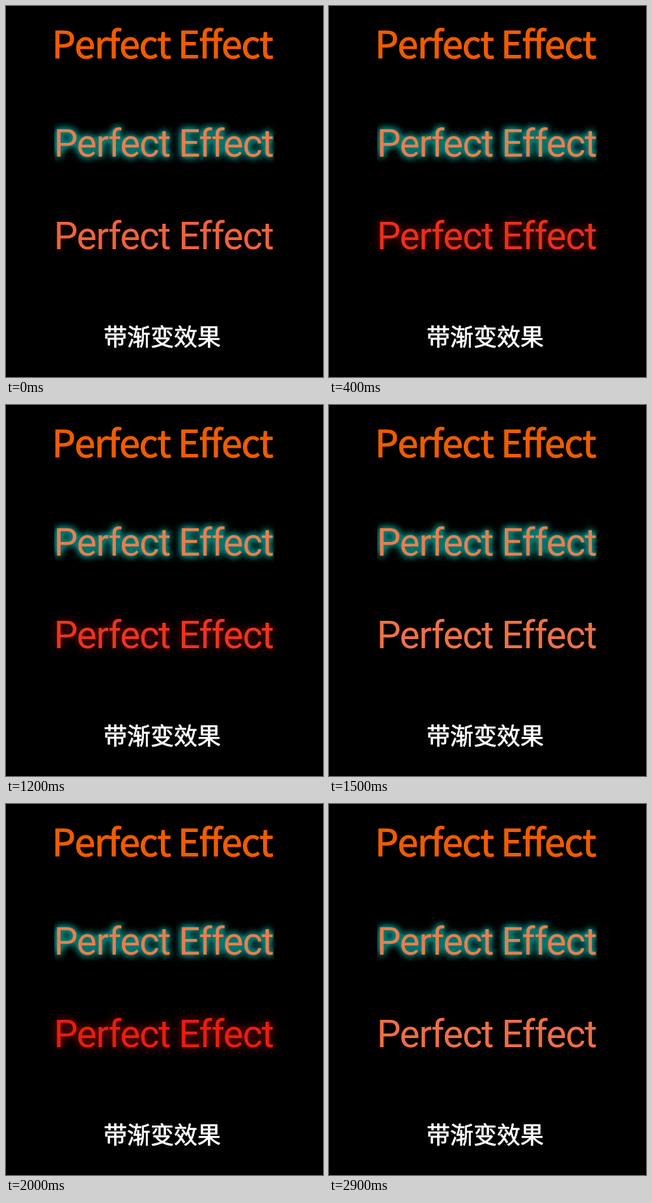
An HTML page that plays this animation: 487 px wide and 569 px high, repeating every 3000 ms.

```html
<!DOCTYPE html>
<html lang="zh">
<head>
<meta charset="utf-8">
<title>Text glow</title>
<style>
  html, body { margin: 0; width: 100%; height: 100%; overflow: hidden; background: #000; }
  svg { display: block; width: 487px; height: 569px; }
  text { font-kerning: none; font-variant-ligatures: none; }
  .solid, .caption { font-family: "Noto Sans CJK SC", "Noto Sans CJK", sans-serif; stroke-linejoin: round; }
  .solid { font-size: 57.5px; letter-spacing: -1.42px; fill: #ee5c00; stroke: #ee5c00; stroke-width: 1.1px; }
  .plain { font: 400 58.5px Roboto, sans-serif; letter-spacing: -1.37px; }
  .caption { font-size: 36px; fill: #fff; stroke: #fff; stroke-width: .7px; }
  .teal { fill: #00746d; filter: url(#halo); }
  .coral { fill: #e87e4e; }
  #glow { fill: #e81400; filter: blur(7px); opacity: 0; }
  #pulse { fill: #ee7548; }
</style>
</head>
<body>
<svg viewBox="0 0 487 569">
  <defs>
    <filter id="halo" filterUnits="userSpaceOnUse" x="74" y="178" width="338" height="63" color-interpolation-filters="sRGB">
      <feGaussianBlur stdDeviation="6"/>
      <feComponentTransfer><feFuncA type="linear" slope="3"/></feComponentTransfer>
    </filter>
  </defs>
  <text class="solid" x="70.4" y="79.7">Perfect Effect</text>
  <text class="plain teal" x="73.4" y="231" aria-hidden="true">Perfect Effect</text>
  <text class="plain coral" x="73.4" y="231">Perfect Effect</text>
  <text class="plain" id="glow" x="73.4" y="373" aria-hidden="true">Perfect Effect</text>
  <text class="plain" id="pulse" x="73.4" y="373">Perfect Effect</text>
  <text class="caption" x="150" y="520.5">带渐变效果</text>
</svg>
<script>
  const LOOP = 3000, STEP = 100, HALF = 692.5, LEAD = 90;

  function pulse(id, frames) {
    const anim = document.getElementById(id).animate(frames, {
      duration: HALF, easing: 'cubic-bezier(.25, .2, .25, 1)', direction: 'alternate', iterations: Infinity
    });
    anim.pause();
    return anim;
  }

  const anims = [
    pulse('pulse', { fill: ['#ee7548', '#ea1a0a'] }),
    pulse('glow', { opacity: [0, 0.75] })
  ];

  // The pulse is at its palest LEAD ms into the loop.
  function draw() {
    const t = Math.floor(performance.now() % LOOP / STEP) * STEP;
    for (const a of anims) a.currentTime = t + 2 * HALF - LEAD;
    requestAnimationFrame(draw);
  }
  draw();
</script>
</body>
</html>
```
